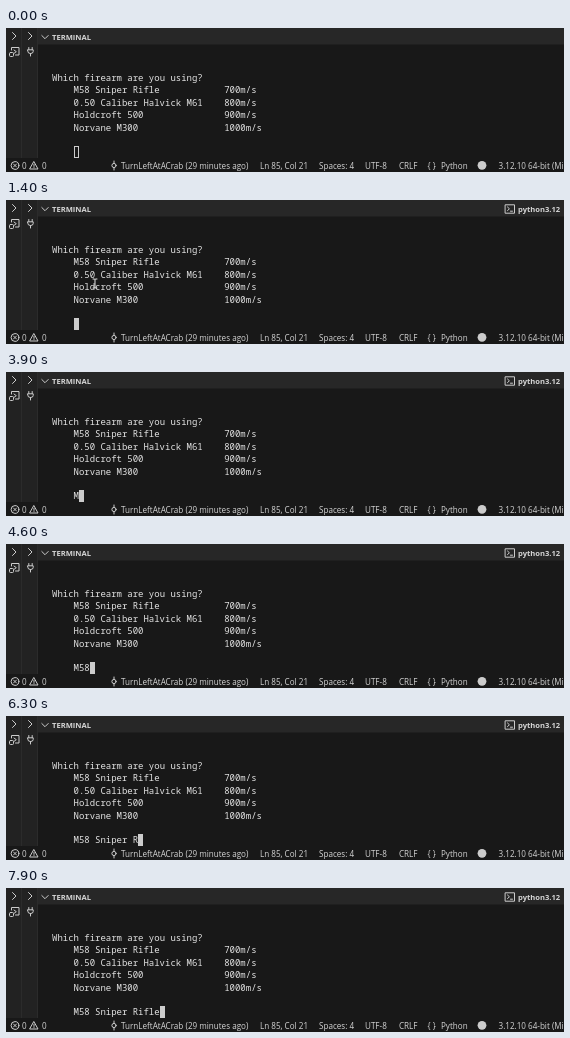
Recreate the animation shown at these times as an HTML page. Size 558x144 px, loop 8 s.

```html
<!DOCTYPE html>
<html lang="en">
<head>
<meta charset="utf-8">
<title>Terminal</title>
<style>
  html, body { margin: 0; width: 100%; height: 100%; overflow: hidden; background: #181818; }
  svg { display: block; width: 558px; height: 144px; }
  text { white-space: pre; fill: #d6d6d6; }
  .mono { font: 8.97px "Noto Sans Mono", "DejaVu Sans Mono", monospace; fill: #e4e4e4; }
  .bar { font: 8.1px "Open Sans", "Noto Sans", sans-serif; }
  .head { font: 700 7.6px "Open Sans", "Noto Sans", sans-serif; }
  .icon { fill: none; stroke: #cccccc; stroke-width: 1; stroke-linecap: round; stroke-linejoin: round; }
  .rule { stroke: #2b2b2b; fill: none; }
</style>
</head>
<body>
<svg viewBox="0 0 558 144">
  <rect width="558" height="144" fill="#181818"/>
  <rect width="32" height="130" fill="#222222"/>
  <rect x="32" width="526" height="16.5" fill="#272727"/>
  <path class="rule" d="M15.5 0V130M31.5 0V130"/>

  <g class="icon">
    <path d="M6.5 4.5L10 8L6.5 11.5M22.5 4.5L26 8L22.5 11.5M35.8 7.5L39 10.7L42.2 7.5"/>
    <path d="M5.5 22V19.5H13V27H9.5M8 22L10.3 23.7L8 25.4"/>
    <rect x="3.5" y="24.5" width="4" height="4" rx="1"/>
    <path d="M22.8 19.5V21.5M26.2 19.5V21.5M21.8 21.8H27.2V23.5Q27.2 25.5 24.5 25.5Q21.8 25.5 21.8 23.5ZM24.5 25.5V28"/>
  </g>
  <text class="head" x="46" y="11.8">TERMINAL</text>
  <g id="shell">
    <path class="icon" d="M499.5 4.8H508.5V13.2H499.5ZM501.5 7L503.4 8.8L501.5 10.6M504.5 11.2H506.5"/>
    <text class="head" x="512" y="11.8">python3.12</text>
  </g>

  <g id="lines"></g>
  <text id="typed" class="mono" x="67.5" y="127.4"></text>
  <rect id="block" y="118" width="5" height="12" fill="#cccccc"/>
  <rect id="outline" x="68.5" y="118.5" width="4" height="11" fill="none" stroke="#cccccc"/>

  <g class="icon">
    <circle cx="9" cy="137.5" r="3.9"/>
    <path d="M7.5 136L10.5 139M10.5 136L7.5 139M28 133.8L32 141H24ZM28 136.3V138.4M28 139.6V139.7"/>
    <circle cx="108" cy="137.5" r="2.1"/>
    <path d="M108 133V135.4M108 139.6V142"/>
  </g>
  <circle cx="476" cy="137.3" r="4.4" fill="#cccccc"/>
  <g id="status"></g>

  <path id="pointer" d="M-2 -4.5H-.7L0 -4L.7 -4.5H2M0 -4V4M-2 4.5H-.7L0 4L.7 4.5H2"
        fill="none" stroke="#e6e6e6" stroke-linecap="round"/>
</svg>
<script>
const LOOP = 8000, CELL = 5.382, LEFT = 46, ROW = 12.4;
const FOCUS_AT = 400;
const ANSWER = "M58 Sniper Rifle";
const KEY_TIMES = [3600, 4100, 4400, 4700, 5000, 5300, 5500, 5650,
                   5800, 5950, 6100, 6250, 6450, 6600, 6750, 6900];
const POINTER_PATH = [[500, 125, 150], [900, 104, 116], [1400, 89, 83.5],
                      [1900, 78, 88], [2300, 64, 58], [2600, 60, -10]];

const $ = id => document.getElementById(id);
const show = (id, visible) => { $(id).style.display = visible ? "" : "none"; };
const column = n => LEFT + n * CELL;

function addText(parent, cls, x, y, content) {
  const node = document.createElementNS("http://www.w3.org/2000/svg", "text");
  node.setAttribute("class", cls);
  node.setAttribute("x", x);
  node.setAttribute("y", y);
  node.textContent = content;
  parent.append(node);
}

addText($("lines"), "mono", LEFT, 53, "Which firearm are you using?");
[
  ["M58 Sniper Rifle", "700m/s"],
  ["0.50 Caliber Halvick M61", "800m/s"],
  ["Holdcroft 500", "900m/s"],
  ["Norvane M300", "1000m/s"]
].forEach(([name, speed], i) => {
  const y = 53 + (i + 1) * ROW;
  addText($("lines"), "mono", column(4), y, name);
  addText($("lines"), "mono", column(32), y, speed);
});

[
  [16, "0"], [36, "0"], [115, "TurnLeftAtACrab"], [179.5, "(29 minutes ago)"],
  [254, "Ln 85, Col 21"], [313, "Spaces: 4"], [359, "UTF-8"], [393, "CRLF"],
  [421.5, "{ }"], [435, "Python"], [492.5, "3.12.10 64-bit (Mi"]
].forEach(([x, label]) => addText($("status"), "bar", x, 140.6, label));

function pointerAt(t) {
  const next = POINTER_PATH.findIndex(p => p[0] > t);
  if (next < 1) return null;
  const [t0, x0, y0] = POINTER_PATH[next - 1];
  const [t1, x1, y1] = POINTER_PATH[next];
  const u = (t - t0) / (t1 - t0), ease = u * u * (3 - 2 * u);
  return [x0 + (x1 - x0) * ease, y0 + (y1 - y0) * ease];
}

function render(t) {
  const focused = t >= FOCUS_AT;
  const count = KEY_TIMES.filter(k => k <= t).length;
  show("shell", focused);
  show("block", focused);
  show("outline", !focused);
  $("typed").textContent = ANSWER.slice(0, count);
  $("block").setAttribute("x", Math.round(column(4 + count)));

  const spot = pointerAt(t);
  show("pointer", spot);
  if (spot) $("pointer").setAttribute("transform", `translate(${spot})`);
}

const start = performance.now();
function tick() {
  render((performance.now() - start) % LOOP);
  requestAnimationFrame(tick);
}
tick();
</script>
</body>
</html>
```
